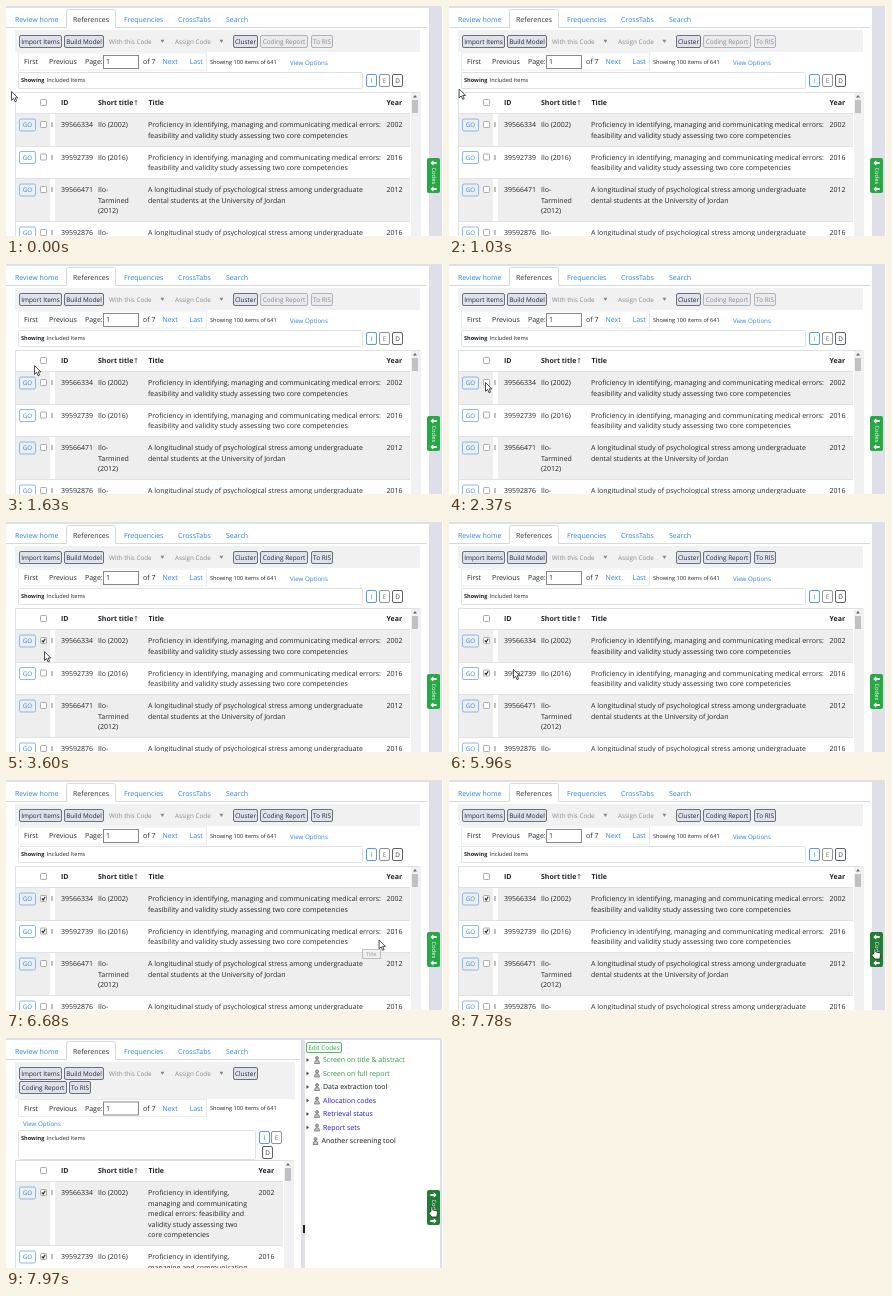
Write an HTML page that moves like this. It is 437 px wide and 230 px high and loops after 8 s.

```html
<!DOCTYPE html>
<html lang="en">
<head>
<meta charset="utf-8">
<title>Reference list</title>
<style>
html, body { margin: 0; width: 100%; height: 100%; overflow: hidden; background: #fff; }
svg { display: block; width: 437px; height: 230px; }
text { font-family: "Open Sans", "Noto Sans", sans-serif; text-rendering: geometricPrecision; white-space: pre; }
</style>
</head>
<body>
<svg id="stage" viewBox="0 0 437 230" xmlns="http://www.w3.org/2000/svg"></svg>
<script>
const BLUE = '#2a84e8', INK = '#212529', GREY = '#85888c', GREEN = '#28a745', STRIP = '#dfdfea';
const LOOP = 8000, OPEN_AT = 7910;

const text = (x, y, s, fill = INK, size = 7, extra = '') =>
  `<text x="${x}" y="${y}" fill="${fill}" font-size="${size}" ${extra}>${s}</text>`;
const bold = (x, y, s, size = 7) => text(x, y, s, INK, size, 'font-weight="700"');
const rect = (x, y, w, h, fill, stroke = 'none', r = 0, extra = '') =>
  `<rect x="${x}" y="${y}" width="${w}" height="${h}" rx="${r}" fill="${fill}" stroke="${stroke}" ${extra}/>`;
const path = (d, fill, extra = '') => `<path d="${d}" fill="${fill}" ${extra}/>`;
const button = (x, y, w, h, s, color, fill = 'none', stroke = color, size = 6.4) =>
  rect(x + .5, y + .5, w - 1, h - 1, fill, stroke, 1.5, 'stroke-width=".8"') +
  text(x + w / 2, y + h / 2 + 2.3, s, color, size, 'text-anchor="middle"');
const checkbox = (y, id) => rect(34.5, y - 3, 6, 6, '#fff', '#999', .8, `stroke-width=".8" class="box${id}"`) +
  path(`M35.8 ${y}l1.4 1.5 2-3.3`, 'none', `stroke="#222" stroke-width="1.1" class="tick${id}"`);

function tabs(right) {
  return path(`M0 21.5H60.5V5.5q0-2 2-2H107.5q2 0 2 2V21.5H${right}`, 'none', 'stroke="#d5d8dc"') +
    text(9, 15.5, 'Review home', BLUE) + text(67, 15.5, 'References', '#333') +
    text(118, 15.5, 'Frequencies', BLUE) + text(172, 15.5, 'CrossTabs', BLUE) + text(220, 15.5, 'Search', BLUE);
}

// Export buttons are enabled once an item is selected.
function exports(x1, x2, y, on) {
  const style = on ? ['#212529', '#dfe2ec', '#4c535b'] : [GREY, '#ebebef', '#a0a4aa'];
  return button(x1, y, 48, 13, 'Coding Report', ...style) + button(x2, y, 22, 13, 'To RIS', ...style);
}

function toolbar(right, height) {
  const style = [INK, '#dfe2ec', '#4c535b'];
  return rect(9, 24, right - 9, height, '#f1f1f1') +
    button(13, 29, 43, 13, 'Import Items', ...style) + button(58, 29, 40, 13, 'Build Model', ...style) +
    text(103, 38, 'With this Code', GREY, 6.3) + path('M154.4 33.8h4l-2 3.2z', GREY) +
    text(169, 38, 'Assign Code', GREY, 6.3) + path('M213.4 33.8h4l-2 3.2z', GREY) +
    button(227, 29, 25, 13, 'Cluster', ...style);
}

function pager(y) {
  return rect(12.5, y - 11, 188, 17, '#fff', '#e9ebee') +
    text(18, y, 'First') + text(43, y, 'Previous') + text(79, y, 'Page:') +
    rect(97.5, y - 8.5, 35, 13, '#fff', '#888') + text(100, y, '1') + text(137, y, 'of 7') +
    text(156.5, y, 'Next', BLUE) + text(183.5, y, 'Last', BLUE) +
    text(204, y - .5, 'Showing 100 items of 641', INK, 5.6);
}

const summary = (y, w, h) => rect(12.5, y, w, h, '#fff', '#dfe2e5', 1) +
  bold(15, y + 9.5, 'Showing', 5.6) + text(40.8, y + 9.5, 'Included Items', INK, 5.6);

const rows = [
  { id: '39566334', name: ['Ilo (2002)'], year: 2002 },
  { id: '39592739', name: ['Ilo (2016)'], year: 2016 },
  { id: '39566471', name: ['Ilo-', 'Tarmined', '(2012)'], year: 2012 },
  { id: '39592876', name: ['Ilo-'], year: 2016 }
];
const wideStudy = ['Proficiency in identifying, managing and communicating medical errors:',
  'feasibility and validity study assessing two core competencies'];
const narrowStudy = ['Proficiency in identifying,', 'managing and communicating',
  'medical errors: feasibility and', 'validity study assessing two', 'core competencies'];
const stress = ['A longitudinal study of psychological stress among undergraduate',
  'dental students at the University of Jordan'];
const wideTitles = [wideStudy, wideStudy, stress, stress];

function table(top, right, yearX, titles) {
  const lines = (x, y, list) => list.map((s, i) => text(x, y + i * 10.5, s)).join('');
  const head = top + 13.2;
  let y = top + 21.5;
  let out = path(`M9.5 230V${top + .5}H${right}V230`, 'none', 'stroke="#dfe2e5"') +
    checkbox(top + 10.5, 'Head') + bold(55, head, 'ID') + bold(92, head, 'Short title') +
    path(`M130 ${head}v-5m-1.2 1.5l1.2-1.5 1.2 1.5`, 'none', 'stroke="#212529" stroke-width=".6"') +
    bold(142.5, head, 'Title') + bold(yearX, head, 'Year');
  titles.forEach((title, i) => {
    const { id, name, year } = rows[i];
    const h = Math.max(title.length, name.length) * 10.5 + 11.5, base = y + 13.5;
    out += rect(10, y, right - 20, h, i % 2 ? '#fff' : '#eee') + rect(44, y, 5, h, '#fff') +
      path(`M10 ${Math.floor(y) + .5}h${right - 20}`, 'none', 'stroke="#dee2e6"') +
      button(13, y + 5, 17, 13, 'GO', BLUE, 'none', '#6ea9ec', 6.2) + checkbox(y + 11, i) +
      text(45, base, 'I') + text(55, base, id) + lines(92, base, name) +
      lines(142, base, title) + text(yearX, base, year);
    y += h;
  });
  const x = right - 9;
  return out + rect(x, top + 1, 8, 230, '#f1f1f1') + path(`M${x + 2} ${top + 5.5}h4l-2-2.5z`, '#666') +
    rect(x + 1, top + 8, 6, 13, '#c1c1c1');
}

function tree() {
  const items = [['Screen on title &amp; abstract', '#2d9a3f'], ['Screen on full report', '#2d9a3f'],
    ['Data extraction tool', '#111'], ['Allocation codes', '#1919d8'], ['Retrieval status', '#1919d8'],
    ['Report sets', '#1919d8'], ['Another screening tool', '#111']];
  return button(300, 4, 36, 11, 'Edit Codes', GREEN, '#fff', GREEN, 6.4) + items.map(([s, color], i) => {
    const y = 22 + i * 13.5, leaf = i == 6, x = leaf ? 307 : 308.5;
    return (leaf ? '' : path(`M300.5 ${y - 2}v4l2.5-2z`, '#444')) +
      `<circle cx="${x + 2.5}" cy="${y - 2}" r="1.5" fill="#b8aaa0" stroke="#555" stroke-width=".6"/>` +
      path(`M${x} ${y + 3.5}q0-3.5 2.5-3.5t2.5 3.5z`, '#c4c4c8', 'stroke="#555" stroke-width=".6"') +
      text(leaf ? 315.5 : 317, y + 2.4, s, color);
  }).join('');
}

const filters = places => ['I', 'E', 'D'].map((s, i) =>
  button(...places[i], 11, 13, s, [BLUE, '#777', '#343a40'][i])).join('');

const wide = rect(423, 0, 13, 230, STRIP) + tabs(421) + toolbar(414, 22) +
  `<g id="off">${exports(254, 305, 29, false)}</g><g id="on">${exports(254, 305, 29, true)}</g>` +
  pager(58) + text(284, 59.3, 'View Options', BLUE, 6.2) + summary(66.5, 344, 16) +
  filters([[360, 68], [373, 68], [386, 68]]) + table(86, 414, 380.5, wideTitles);

const narrow = tabs(294) + toolbar(289, 37) + exports(13, 63, 43, true) + pager(72.5) +
  text(17, 87.5, 'View Options', BLUE, 6.2) + summary(92.5, 237, 29) +
  filters([[253, 93], [265, 93], [256, 108]]) + table(122, 287, 252.5, [narrowStudy, narrowStudy]) +
  rect(295, 0, 4, 230, STRIP) + rect(297, 187, 2, 8, '#222') + tree();

const arrow = y => path(`M424.3 ${y}l3-2.7v1.6h3.4v2.2h-3.4v1.6z`, '#fff');
const codes = rect(421, 152, 13, 35, GREEN, 'none', 2, 'id="codes"') +
  `<g id="arrows">${arrow(157)}${arrow(183)}</g>` +
  text(0, 0, 'Codes', '#fff', 5.8, 'text-anchor="middle" transform="translate(425.6 169.8) rotate(90)"');

const tooltip = `<g id="tip" opacity=".7">${rect(356.5, 169.5, 18, 9, '#f0f0f0', '#aaa')}${text(360, 176, 'Title', '#777', 5.2)}</g>`;
const outline = 'stroke="#222" stroke-width=".8" stroke-linejoin="round"';
const pointer = `<g id="cursor"><g id="pointer">${path('M.5 .5V9.3L2.6 7.4 4.1 10.8 5.6 10.1 4.1 6.9H6.9z', '#fff', outline)}</g>
  <g id="hand">${path('M1 5.5V1q1-1.2 1.8 0V4l4 .9q1 .4.8 1.6l-.8 4.5H1.7L-1 7.5q-.4-1.5.8-1.2z', '#fff', outline)}</g></g>`;

const stage = document.getElementById('stage');
stage.innerHTML = rect(0, 0, 437, 230, '#fff') + rect(434, 0, 2, 230, STRIP) +
  `<g id="wide">${wide}</g><g id="narrow">${narrow}</g>` + rect(0, 0, 436, 2, STRIP) + codes + tooltip + pointer;

const $ = id => document.getElementById(id);
const show = (el, on) => el.setAttribute('visibility', on ? 'visible' : 'hidden');
const showAll = (selector, on) => stage.querySelectorAll(selector).forEach(el => show(el, on));

// Pointer path: time, x, y
const route = [
  [0, 5, 85], [180, 6, 78], [850, 6, 78], [1250, 14, 88], [1630, 28, 101], [1690, 29, 102],
  [2370, 36, 118], [3300, 36, 118], [3600, 38, 129], [3900, 41, 166], [4080, 40, 157],
  [4150, 40, 157], [4400, 34, 149], [4710, 36, 151], [5780, 36, 151], [6000, 70, 146],
  [6200, 180, 141], [6450, 310, 150], [6620, 362, 158], [6680, 372.5, 159.5], [7100, 395, 158],
  [7460, 424, 168], [LOOP, 424, 168]
];
function position(t) {
  const i = route.findIndex(p => p[0] > t), [t0, x0, y0] = route[i - 1], [t1, x1, y1] = route[i];
  const k = (t - t0) / (t1 - t0);
  return [x0 + (x1 - x0) * k, y0 + (y1 - y0) * k];
}

function render(t) {
  const open = t >= OPEN_AT, hover = t >= 7460;
  $('wide').style.display = open ? 'none' : '';
  $('narrow').style.display = open ? '' : 'none';
  show($('on'), t >= 3030);
  show($('off'), t < 3030);
  showAll('.tickHead, .tick2, .tick3', false);
  showAll('.tick0', t >= 3030);
  showAll('.tick1', t >= 5240);
  const press = (id, from, to) => stage.querySelectorAll('.box' + id).forEach(el =>
    el.setAttribute('fill', t >= from && t < to ? '#ddd' : '#fff'));
  press(0, 2830, 3030);
  press(1, 5110, 5240);
  show($('tip'), t >= 6680 && t < 6740);
  $('codes').setAttribute('fill', t >= 7520 ? '#1e7e34' : hover ? '#239339' : GREEN);
  $('arrows').setAttribute('transform', open ? 'translate(855 0) scale(-1 1)' : '');
  show($('pointer'), !hover);
  show($('hand'), hover);
  $('cursor').setAttribute('transform', `translate(${position(t)})`);
}

const start = performance.now();
(function tick() {
  render((performance.now() - start) % LOOP);
  requestAnimationFrame(tick);
})();
</script>
</body>
</html>
```
